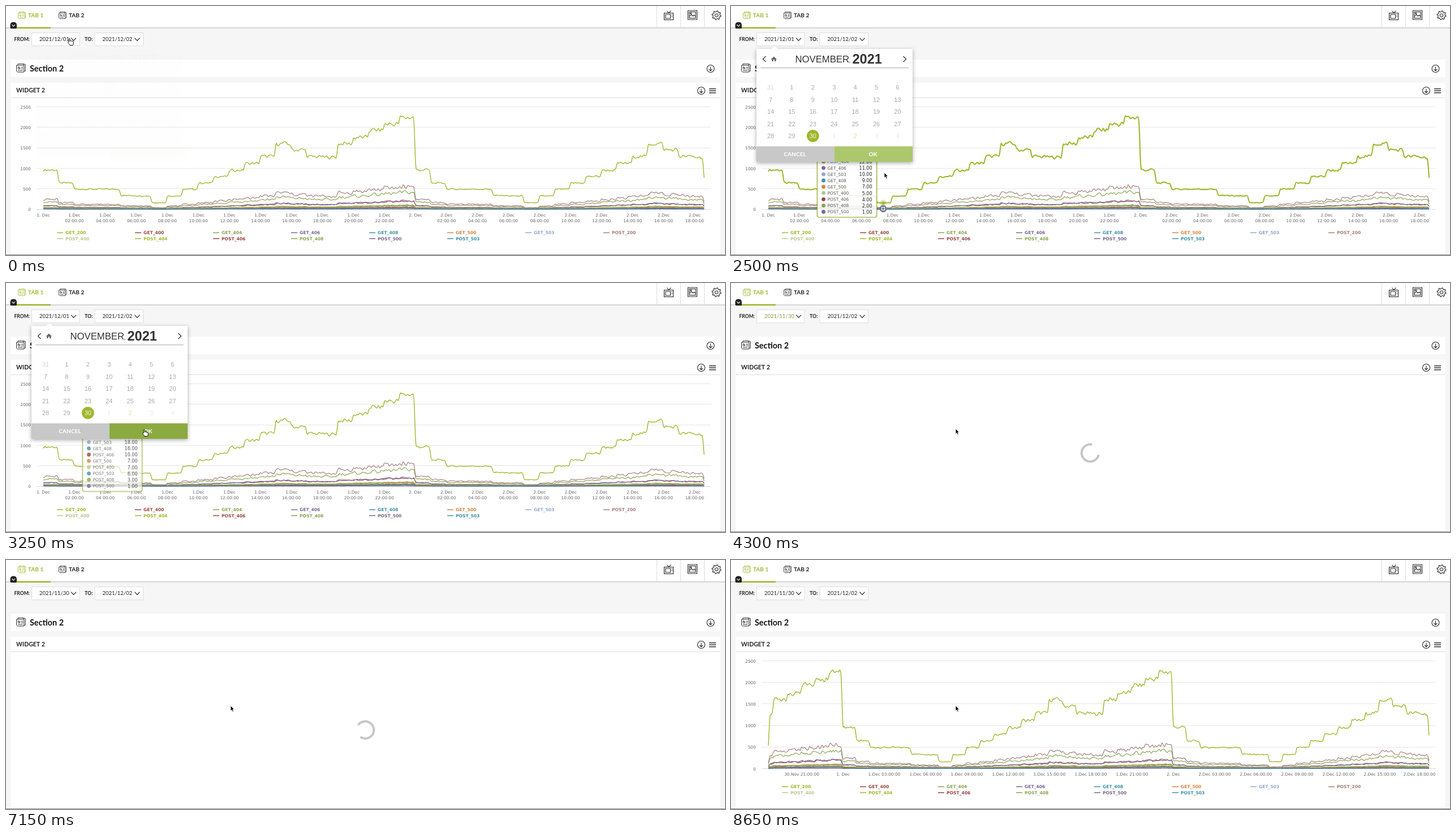
Write an HTML page with a canvas that moves like this. It is 1271 px wide and 441 px high and loops after 8.85 s.

```html
<!DOCTYPE html>
<html lang="en">
<head>
<meta charset="utf-8">
<title>Dashboard date filter</title>
<style>
  html, body { margin: 0; width: 100%; height: 100%; overflow: hidden; background: #f6f6f6; }
  canvas { display: block; }
</style>
</head>
<body>
<canvas id="stage" width="1271" height="441"></canvas>
<script>
const ctx = document.getElementById('stage').getContext('2d');
const LOOP = 8850, CLOSE = 3400, RELOAD = 7450;
const UI = 'Lato, sans-serif', CAL = '"Liberation Sans", sans-serif', PLOT = '"DejaVu Sans", sans-serif';
const GREEN = '#a0b72c', INK = '#222';

// name, colour, share of the main series
const SERIES = [
  ['GET_200', GREEN, 1], ['GET_400', '#9c433f', .088], ['GET_404', '#89a54e', .185],
  ['GET_406', '#7b6595', .09], ['GET_408', '#3d91ab', .04], ['GET_500', '#d4843f', .035],
  ['GET_503', '#92a8cd', .045], ['POST_200', '#a47d7c', .25], ['POST_400', '#b5ca92', .025],
  ['POST_404', GREEN, .045], ['POST_406', '#9c433f', .022], ['POST_408', '#89a54e', .012],
  ['POST_500', '#7b6595', .004], ['POST_503', '#3d91ab', .015]
];
const HOURLY = [960, 640, 490, 490, 490, 335, 325, 160, 325, 490, 640, 800,
  950, 1120, 1290, 1600, 1450, 1285, 1270, 1600, 1750, 1930, 2080, 2240];
const FIRST = -54, LAST = 426; // samples, ten per hour, from 1 Dec 00:00

const clamp = v => Math.max(0, Math.min(1, v));
const smooth = v => v * v * (3 - 2 * v);

function text(str, x, y, size, color, family = UI, weight = 400, align = 'left') {
  ctx.font = `${weight} ${size}px ${family}`;
  ctx.fillStyle = color;
  ctx.textAlign = align;
  ctx.fillText(str, x, y + size * .36);
}
function rect(x, y, w, h, color) {
  ctx.fillStyle = color;
  ctx.fillRect(x, y, w, h);
}
function disc(x, y, r, color) {
  ctx.fillStyle = color;
  ctx.beginPath();
  ctx.arc(x, y, r, 0, 7);
  ctx.fill();
}
function stroke(d, x, y, color = INK, width = 1.1, fill) {
  const path = typeof d === 'string' ? new Path2D(d) : d;
  ctx.save();
  ctx.translate(x, y);
  if (fill) { ctx.fillStyle = fill; ctx.fill(path); }
  ctx.strokeStyle = color;
  ctx.lineWidth = width;
  ctx.stroke(path);
  ctx.restore();
}

/* ---------- chart ---------- */
function random(i, s) {
  const v = Math.sin(i * 12.9898 + s * 78.233) * 43758.5453;
  return v - Math.floor(v);
}
function sample(i, s) {
  const hour = ((Math.floor(i / 10) % 24) + 24) % 24;
  const edge = i === LAST ? .6 : i === FIRST ? .42 : 1;
  const wobble = (random(i, s) - .5) * (s ? .26 : .075);
  return HOURLY[hour] * SERIES[s][2] * edge * (1 + wobble);
}
function makeChart(from, perHour, midnight, zero, labels) {
  const unit = (zero - 178.5) / 2500;
  const lines = SERIES.map((_, s) => {
    const path = new Path2D();
    const at = i => [midnight + i * perHour / 10, zero - sample(i, s) * unit];
    path.moveTo(...at(from));
    for (let i = from + 1; i < LAST; i++) {
      const [x, y] = at(i), [nx, ny] = at(i + 1);
      path.quadraticCurveTo(x, y, (x + nx) / 2, (y + ny) / 2);
    }
    path.lineTo(...at(LAST));
    return path;
  });
  return { lines, zero, labels };
}
const clock = h => String(h).padStart(2, '0') + ':00:00';
const dayLabels = Array.from({ length: 22 }, (_, k) => {
  const day = k < 12 ? 1 : 2, h = k * 2 % 24;
  return { x: 66 + k * 54.83, rows: h ? [`${day}.Dec`, clock(h)] : [`${day}. Dec`] };
});
// the last label is pushed back inside the plot
const wideLabels = Array.from({ length: 16 }, (_, k) => {
  const h = (21 + k * 3) % 24, day = ['30.Nov', '1.Dec', '2.Dec'][Math.floor((k + 7) / 8)];
  return { x: Math.min(125 + k * 73, 1217), rows: [h ? `${day} ${clock(h)}` : day.replace('.', '. ')] };
});
const shortChart = makeChart(0, 27.42, 66, 360, dayLabels);
const longChart = makeChart(FIRST, 24.33, 197.5, 369.5, wideLabels);

function drawChart(chart, reveal, hover) {
  for (let k = 0; k <= 5; k++) {
    const y = chart.zero - k * (chart.zero - 178.5) / 5;
    rect(54, Math.floor(y), 1192, 1, k ? '#e6e6e6' : '#d5dbe2');
    text(k * 500, 44, y + .5, 7.4, '#666', PLOT, 400, 'right');
  }
  for (const { x, rows } of chart.labels)
    rows.forEach((row, r) => text(row, x, chart.zero + 10 + r * 10, 7.4, '#666', PLOT, 400, 'center'));

  ctx.save();
  ctx.beginPath();
  ctx.rect(54, 165, 1192 * reveal, 220);
  ctx.clip();
  ctx.lineJoin = 'round';
  chart.lines.forEach((line, s) => stroke(line, 0, 0, SERIES[s][1], s ? 1.2 : hover ? 2.1 : 1.4));
  ctx.restore();

  SERIES.forEach(([name, color], s) => {
    const x = 90 + s % 8 * 138, y = s < 8 ? 401.5 : 412;
    rect(x, y - .75, 11, 1.5, color);
    text(name, x + 15, y, 7.6, color, PLOT, 700);
  });
}

const TIP_A = 'POST_404 12,GET_406 11,GET_503 10,GET_408 9,GET_500 7,POST_400 5,POST_406 4,POST_408 2,POST_500 1';
const TIP_B = 'GET_503 18,GET_408 16,POST_406 10,GET_500 7,POST_400 7,POST_503 6,POST_408 3,POST_500 1';

function drawTooltip(t, pointerX, hover) {
  const point = (hover ? pointerX : 254) - 2, x = point - 116.5;
  const early = t < 2650, bottom = early ? 374 : 369;
  if (hover) {
    disc(point, 349, 6, 'rgba(160,183,44,.3)');
    disc(point, 349, 2.8, GREEN);
    disc(point, 359, 6.5, '#737f8a');
    rect(point - 3, 356, 6, 6, '#fff');
    rect(point - 1.8, 357.2, 3.6, 3.6, '#5e6b76');
  }
  ctx.save();
  ctx.globalAlpha = 1 - clamp((t - 3200) / 250);
  const box = new Path2D();
  box.roundRect(0, 0, 105, 165, 3);
  stroke(box, x, bottom - 165, 'rgba(0,0,0,.1)', 3.5);
  stroke(box, x, bottom - 165, GREEN, 1.2, 'rgba(255,255,255,.87)');
  (early ? TIP_A : TIP_B).split(',').reverse().forEach((row, r) => {
    const [name, value] = row.split(' '), y = bottom - 9.5 - r * 11.1;
    disc(x + 11, y, 3.4, SERIES.find(s => s[0] === name)[1]);
    text(name, x + 18, y, 7.5, '#555', PLOT);
    text(value + '.00', x + 97, y + .5, 8, INK, PLOT, 400, 'right');
  });
  ctx.restore();
}

/* ---------- page ---------- */
const ICONS = {
  board: 'M2.5 2.5V.5h8.5l2.5 1v9.5h-1.5M.5 2.5h11v10H2L.5 11zM11 .5v2M7.5 5.5h2.5M7.5 7.5h2.5M2.5 10h7M5.8 6.3a1.6 1.6 0 1 1-1.6-1.6v1.6z',
  down: 'M6.5 0A6.5 6.5 0 1 1-6.5 0A6.5 6.5 0 1 1 6.5 0M0-3.5V3.5M-3 .8L0 3.7L3 .8',
  tv: 'M-8-4H8V8H-8zM-5.5-1.5H3V5.5H-5.5zM-3-8L0-4L4-8M5-1h1.5M5 2h1.5',
  image: 'M-8-8H8V8H-8zM-5.5-5.5H5.5V5.5H-5.5zM-5.5 3L-2-1L1 2L3 0L5.5 3M-1.8-3a1 1 0 1 1-2 0a1 1 0 1 1 2 0',
  chevron: 'M-4.5-2.3L0 2.3L4.5-2.3',
  hand: 'M2.2 7V1.8Q2.2.6 3.2.6Q4.2.6 4.2 1.8V5Q5 4.3 6 5Q7 4.5 8 5.4Q10.2 5.2 10.2 7V9Q10.2 11 9 12.5H4Q3 10.5.8 8.2Q0 7.2.8 6.6Q1.5 6.3 2.2 7Z',
  arrow: 'M0 0V9.4L2.1 7.4L3.7 11L5.3 10.3L3.8 6.8H6.6Z'
};
const gear = new Path2D();
for (let k = 0; k < 32; k++) {
  const r = k % 4 < 2 ? 8 : 6, a = (k + .5) * Math.PI / 16;
  gear.lineTo(r * Math.cos(a), r * Math.sin(a));
}
gear.closePath();
gear.moveTo(2.8, 0);
gear.arc(0, 0, 2.8, 0, 7);

function dateBox(x, w, date, color) {
  rect(x, 47.5, w, 23, '#fff');
  stroke(`M.5 0H${w}V23H.5Z`, x, 47.5, '#ddd', 1);
  text(date, x + 14, 59, 9.5, color);
  stroke(ICONS.chevron, x + w - 10.5, 59, INK, 1.2);
}

function drawPage(t) {
  rect(0, 0, 1271, 441, '#f6f6f6');
  rect(0, 0, 1271, 38, '#fff');
  rect(0, 37.5, 1271, 2.5, '#dadada');
  rect(14, 37.5, 65, 2.5, GREEN);
  ctx.fillStyle = INK;
  ctx.beginPath();
  ctx.roundRect(7.5, 28.5, 11.5, 11.5, [5, 5, 2, 2]);
  ctx.fill();
  stroke('M-2.8-1.4L0 1.4L2.8-1.4', 13.2, 34.5, '#fff', 1.1);

  stroke(ICONS.board, 21, 10, GREEN, .8);
  text('TAB 1', 39, 16.5, 10.1, GREEN, UI, 700);
  stroke(ICONS.board, 93, 10, INK, .8);
  text('TAB 2', 111, 16.5, 10.1, INK, UI, 700);
  for (const x of [1150, 1192, 1234]) rect(x, 0, 1, 38, '#ddd');
  stroke(ICONS.tv, 1171.5, 16.5);
  stroke(ICONS.image, 1213.5, 16);
  stroke(gear, 1256, 16.5);

  text('FROM:', 14.5, 59, 8.6, INK, UI, 700);
  text('TO:', 139, 59, 8.8, INK, UI, 700);
  const pending = t >= CLOSE && t < 6200;
  dateBox(45, 85, t < CLOSE ? '2021/12/01' : '2021/11/30', pending ? '#8b9a45' : INK);
  dateBox(156.5, 86, '2021/12/02', INK);

  rect(8, 95, 1255, 31, '#fff');
  ctx.save();
  ctx.translate(18, 102);
  ctx.scale(1.2, 1.2);
  stroke(ICONS.board, 0, 0, INK, .8);
  ctx.restore();
  text('Section 2', 42, 110.5, 14.4, '#111', UI, 700);
  stroke(ICONS.down, 1245.5, 111);

  rect(8, 136, 1255, 304, '#fff');
  rect(8, 162, 1255, 1, '#dedede');
  text('WIDGET 2', 18, 149, 10.5, INK, UI, 700);
  stroke(ICONS.down, 1229, 150);
  for (const y of [146, 149.5, 153]) rect(1243, y, 12, 1.4, INK);
}

function drawSpinner(t) {
  const gap = (57 - 90 + (t - 4300) * 360 / 800) * Math.PI / 180;
  ctx.beginPath();
  ctx.arc(635, 301, 15.2, gap + Math.PI / 4, gap + Math.PI * 7 / 4);
  ctx.strokeStyle = '#c6c6c6';
  ctx.lineWidth = 4;
  ctx.stroke();
}

function drawCalendar(november, okHover, alpha) {
  ctx.save();
  ctx.globalAlpha = alpha;
  ctx.shadowColor = 'rgba(0,0,0,.35)';
  ctx.shadowBlur = 7;
  ctx.shadowOffsetY = 2;
  rect(45, 76, 276, 200, '#fff');
  ctx.shadowColor = 'transparent';
  ctx.fillStyle = '#fff';
  ctx.fill(new Path2D('M71 76.5L77 71L83 76.5Z'));

  stroke('M2.5-5L-2.5 0L2.5 5', 59, 94, '#444', 1.5);
  stroke('M-2.5-5L2.5 0L-2.5 5', 307, 94, '#444', 1.5);
  ctx.fillStyle = '#666';
  ctx.fill(new Path2D('M70.5 94.5L75.8 89.5L81 94.5H79.5V98H77V95H74.7V98H72.2V94.5Z'));
  text(november ? 'NOVEMBER' : 'DECEMBER', 113.5, 94, 16.7, '#333', CAL);
  text(',', 208.5, 96, 11, '#333', CAL);
  text('2021', 214.5, 93.5, 23.5, '#333', CAL, 700);
  rect(52, 108.5, 262, 2, '#cfcfcf');

  const lead = november ? 1 : 3, length = november ? 30 : 31, before = november ? 31 : 30;
  const selected = november ? 30 : 1;
  for (let k = 0; k < 35; k++) {
    const n = k - lead + 1, inside = n > 0 && n <= length;
    const day = inside ? n : n < 1 ? before + n : n - length;
    const x = 70 + k % 7 * 37.4, y = 144.5 + Math.floor(k / 7) * 21.4;
    let color = november && inside ? '#a9a9a9' : n > length ? '#e8e8e8' : '#d3d3d3';
    if (day === 2 && inside !== november) color = november ? '#dbe4a8' : GREEN;
    if (inside && day === selected) {
      disc(x, y, 10.9, GREEN);
      color = '#f4f7e2';
    }
    text(day, x, y, 11, color, CAL, 400, 'center');
  }
  rect(45, 248.5, 138, 27.5, '#c8c8c8');
  rect(183, 248.5, 138, 27.5, okHover ? '#8bab40' : '#adc76d');
  text('CANCEL', 113, 262, 10.2, '#fff', UI, 700, 'center');
  text('OK', 251, 262, 10.2, '#fff', UI, 700, 'center');
  ctx.restore();
}

// time, x, y of the pointer tip
const MOVES = [[0, 112, 57], [350, 112, 57], [1000, 178, 148], [1550, 178, 148], [1600, 172, 146],
  [1800, 146, 147], [2200, 146, 147], [2500, 271, 295], [2750, 254, 277], [2850, 244, 259],
  [3500, 244, 259], [4050, 397, 258], [LOOP, 397, 258]];

function pointerAt(t) {
  const k = MOVES.findIndex(m => m[0] > t);
  const [t0, x0, y0] = MOVES[k - 1], [t1, x1, y1] = MOVES[k];
  const p = smooth((t - t0) / (t1 - t0));
  return [x0 + (x1 - x0) * p, y0 + (y1 - y0) * p];
}

function draw(t) {
  const [x, y] = pointerAt(t);
  const open = t < CLOSE;
  const onChart = open && y > 277, onButtons = open && y > 248 && y < 277;
  const onDays = open && y > 134 && y < 240;

  drawPage(t);
  if (open) {
    drawChart(shortChart, 1, onChart);
    if (onChart || t > 2500) drawTooltip(t, x, onChart);
  } else if (t < RELOAD) {
    drawSpinner(t);
  } else {
    drawChart(longChart, (1 - Math.cos(Math.PI * clamp((t - RELOAD) / 1000))) / 2, false);
  }
  rect(0, 440, 1271, 1, '#8c8c8c');

  const alpha = open ? clamp(t / 100) : 1 - clamp((t - CLOSE) / 100);
  if (alpha) drawCalendar(t >= 1950, onButtons && x > 183, alpha);

  if (y < 70 || onDays || onButtons) stroke(ICONS.hand, x - 3, y, '#111', 1, '#fff');
  else stroke(ICONS.arrow, x, y, '#fff', .8, '#000');
}

function tick() {
  draw(performance.now() % LOOP);
  requestAnimationFrame(tick);
}
tick();
</script>
</body>
</html>
```
